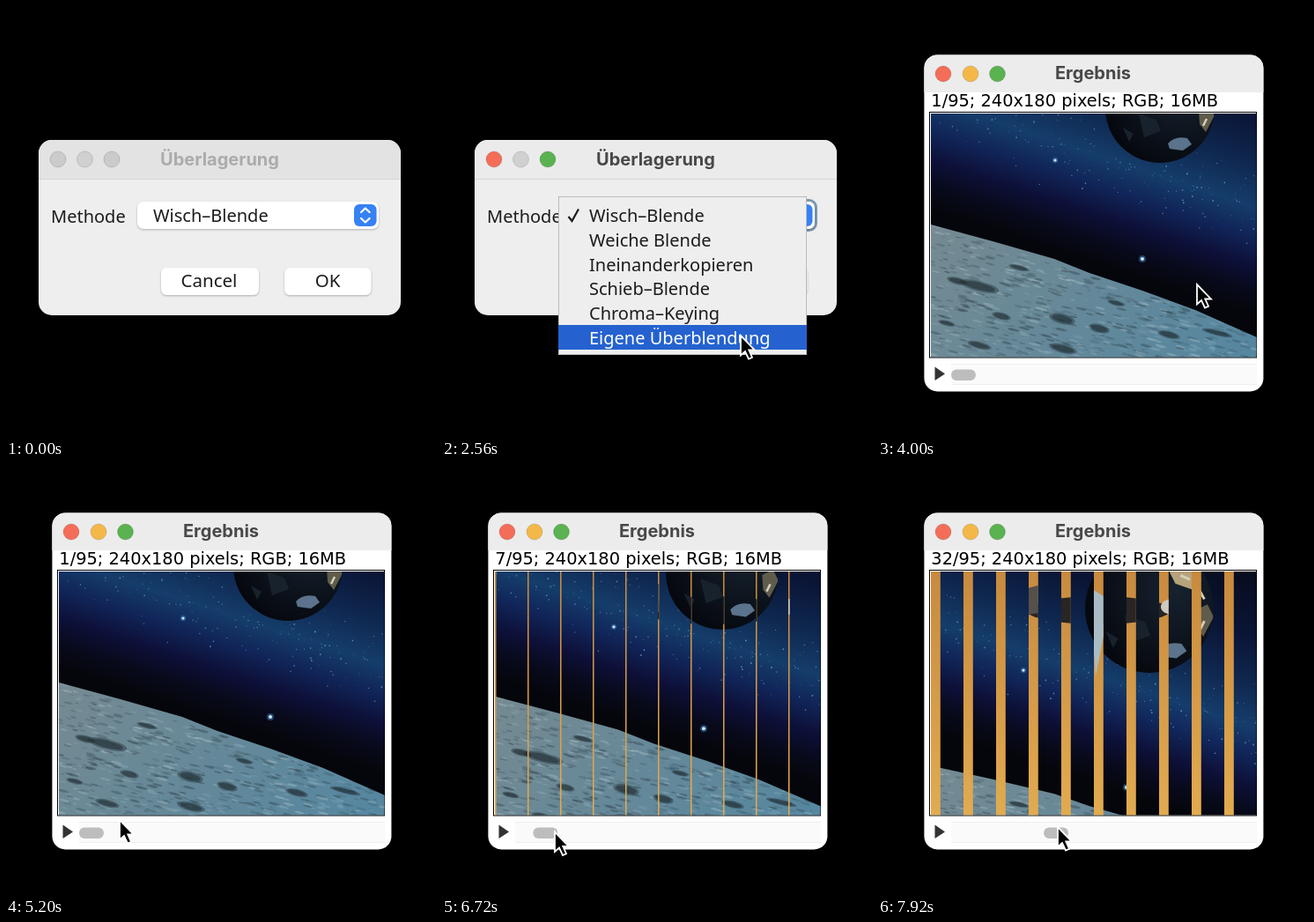
These frames come from a looping animation (488 by 488 pixels, 8000 ms). An HTML page:

```html
<!DOCTYPE html>
<html lang="de">
<head>
<meta charset="utf-8">
<style>
html, body { margin: 0; width: 100%; height: 100%; overflow: hidden; background: #000; }
svg { display: block; width: 100vw; height: 100vh; }
text { font: 20px "Noto Sans", sans-serif; fill: #1c1c1c; white-space: pre; }
.title { font: bold 20px Inter, sans-serif; fill: #484848; text-anchor: middle; }
.status { font: 19.4px "DejaVu Sans", sans-serif; fill: #000; }
.mid { text-anchor: middle; font-size: 20.5px; }
.raised { fill: #fff; filter: drop-shadow(0 1px 1px #0004); }
</style>
</head>
<body>
<svg viewBox="0 0 488 488">
  <defs>
    <linearGradient id="sky" gradientUnits="userSpaceOnUse" x1="300" y1="-30" x2="195" y2="290">
      <stop stop-color="#05070f"/><stop offset=".32" stop-color="#0a1536"/>
      <stop offset=".48" stop-color="#0f2850"/><stop offset=".61" stop-color="#153d6b"/>
      <stop offset=".7" stop-color="#11265a"/><stop offset=".8" stop-color="#0d1038"/>
      <stop offset=".88" stop-color="#080a1c"/><stop offset=".96" stop-color="#05060b"/>
    </linearGradient>
    <linearGradient id="rock" x2="1" y2=".6">
      <stop stop-color="#768a91"/><stop offset="1" stop-color="#5687a0"/>
    </linearGradient>
    <linearGradient id="amber" x2="0" y2="1">
      <stop stop-color="#c88a3e"/><stop offset="1" stop-color="#e2ab50"/>
    </linearGradient>
    <radialGradient id="globe" cx=".7" cy=".35" r=".75">
      <stop stop-color="#16222f"/><stop offset="1" stop-color="#05070d"/>
    </radialGradient>
    <clipPath id="frame"><rect x="60" y="122" width="369.500" height="276.5"/></clipPath>
    <clipPath id="horizon"><path d="M60 248L130 267 200 287 240 303 300 323 360 345 430 376V460H60Z"/></clipPath>
    <clipPath id="slats"></clipPath>
    <clipPath id="disc"><circle r="62"/></clipPath>
  </defs>

  <g id="dialog">
    <rect x="37" y="152" width="411" height="199" rx="15" fill="#eee"/>
    <path id="bar" d="M37 196V167a15 15 0 0 1 15-15H433a15 15 0 0 1 15 15V196Z"/>
    <path d="M37 196.500H448" stroke="#d6d6d6"/>
    <g stroke="#0002"><circle id="red" cx="59" cy="174" r="9"/><circle cx="89.500" cy="174" r="9" fill="#d0d0d0"/><circle id="green" cx="120" cy="174" r="9"/></g>
    <text id="heading" class="title" x="242.500" y="180.500">Überlagerung</text>
    <text x="51" y="246">Methode</text>
    <rect id="ring" x="147.500" y="220.500" width="277" height="34" rx="8" fill="none" stroke="#7d98ad" stroke-width="3"/>
    <rect class="raised" x="149" y="222" width="274" height="31" rx="7"/>
    <rect x="395" y="225" width="25.500" height="25" rx="6" fill="#3681f5"/>
    <path d="M403 234l4.800-4.500 4.800 4.500M403 241l4.800 4.500 4.800-4.500" fill="none" stroke="#fff" stroke-width="2.200" stroke-linecap="round" stroke-linejoin="round"/>
    <text id="choice" x="167" y="245"></text>
    <rect class="raised" x="176" y="297" width="111" height="31" rx="6"/>
    <text class="mid" x="230.500" y="319">Cancel</text>
    <rect class="raised" x="316" y="297" width="98.500" height="31" rx="6"/>
    <text class="mid" x="365" y="319">OK</text>
    <g id="menu">
      <rect x="132.500" y="216.500" width="281" height="179" fill="#eee" stroke="#bbb"/>
      <rect id="hover" x="132" width="282" height="28" fill="#2562d0"/>
      <path d="M143.500 239l4 5L155 230.500" fill="none" stroke="#1c1c1c" stroke-width="2.200"/>
      <g id="items"></g>
    </g>
  </g>

  <g id="result">
    <rect x="52.400" y="55.400" width="385" height="382" rx="15" fill="#fff"/>
    <path d="M52.400 98V70.400a15 15 0 0 1 15-15H422.400a15 15 0 0 1 15 15V98Z" fill="#ececec"/>
    <g stroke="#0002"><circle cx="74" cy="77" r="9" fill="#f46d58"/><circle cx="105" cy="77" r="9" fill="#f4b848"/><circle cx="135.500" cy="77" r="9" fill="#5ab250"/></g>
    <text class="title" x="244" y="83">Ergebnis</text>
    <text id="status" class="status" x="60.300" y="114"></text>
    <rect x="58.500" y="120.500" width="371" height="278.500" fill="#fff" stroke="#000"/>
    <g clip-path="url(#frame)">
      <g id="space"><rect x="-50" y="-150" width="700" height="700" fill="url(#sky)"/></g>
      <g id="earth">
        <circle r="62" fill="url(#globe)"/>
        <g clip-path="url(#disc)">
          <path d="M9 40Q17 31 31 34L36 41 26 48 11 46Z" fill="#5b738c"/>
          <path d="M44 2L56 -4 62 8 52 27 45 18Z" fill="#5f5c4c"/>
          <path d="M18 -38L38 -45 50 -28 42 -18 25 -24Z" fill="#b6a37b"/>
          <path d="M-24 6l20 7 5 13-19 7zM-42 22l12 7-5 9z" fill="#18222c"/>
          <path d="M48 -18l5 9M53 12l-4 8M30 -32l9 4" stroke="#d5cfb8" stroke-width="2.500"/>
        </g>
      </g>
      <g id="moon"><g id="ground" clip-path="url(#horizon)"><rect x="60" y="240" width="370" height="220" fill="url(#rock)"/></g></g>
      <g clip-path="url(#slats)">
        <rect x="60" y="122" width="370" height="277" fill="url(#amber)"/>
        <g id="bird">
          <ellipse cx="250" cy="166" rx="82" ry="16" fill="#292523"/>
          <path d="M166 142l26-7 14 30-36 6z" fill="#55504a"/>
          <path d="M240 140l16 10 2 35-11 56z" fill="#a9bcc6"/>
          <ellipse cx="334" cy="162" rx="13" ry="9" fill="#cfcac0"/>
        </g>
      </g>
    </g>
    <rect x="83" y="406" width="347" height="24" fill="#fafafa"/>
    <path d="M83 406.500H430M83 429.500H430" stroke="#efefef"/>
    <path d="M64.500 409.500L76 417.500 64.500 425Z" fill="#333"/>
    <rect id="thumb" y="412.500" width="28" height="12.500" rx="6.200" fill="#bdbdbd"/>
  </g>
  <path id="cursor" d="M0 0V22.500L5 18 9 26.500 13 24.700 9.300 16.500H16Z" stroke="#fff" stroke-width="1.800"/>
</svg>
<script>
const $ = id => document.getElementById(id);
const set = (el, attrs) => { for (const k in attrs) el.setAttribute(k, attrs[k]); };
const add = (parent, tag, attrs) => {
  const el = document.createElementNS('http://www.w3.org/2000/svg', tag);
  set(el, attrs);
  return parent.appendChild(el);
};
const show = (id, on) => set($(id), { visibility: on ? 'inherit' : 'hidden' });

let seed = 7;
const rnd = () => (seed = seed * 16807 % 2147483647) / 2147483647;

const methods = ['Wisch–Blende', 'Weiche Blende', 'Ineinanderkopieren', 'Schieb–Blende', 'Chroma–Keying', 'Eigene Überblendung'];
const rows = methods.map((m, i) => {
  const el = add($('items'), 'text', { x: 167, y: 245 + 27.8 * i });
  el.textContent = m;
  return el;
});

// Stars along the bright band
for (let i = 0; i < 260; i++) {
  const x = 40 + rnd() * 460;
  const y = 109 + .32 * (x - 60) + (rnd() + rnd() - 1) * 55;
  add($('space'), 'circle', { cx: x, cy: y, r: .4 + rnd() * .5, fill: '#79a8d0', opacity: .25 + rnd() * .6 });
}
const glow = (parent, x, y, r) => {
  add(parent, 'circle', { cx: x, cy: y, r: r * 2, fill: '#3d80c0', opacity: .5 });
  add(parent, 'circle', { cx: x, cy: y, r, fill: '#cfe8fa' });
};
glow($('space'), 201, 175, 1.6);
const lowStar = add($('space'), 'g', {});
glow(lowStar, 300, 287, 2);

// Lunar surface: fine streaks and craters
const patch = (x, y, rx, ry, fill, opacity) =>
  add($('ground'), 'ellipse', { cx: x, cy: y, rx, ry, fill, opacity, transform: `rotate(14 ${x} ${y})` });
for (let i = 0; i < 1000; i++) {
  const x = 60 + rnd() * 370;
  const y = 245 + .34 * (x - 60) + rnd() * 155;
  const s = .4 + rnd();
  patch(x, y, 5 * s, 1.1 * s, rnd() < .6 ? '#26343c' : '#aec5cc', .12 + rnd() * .28);
}
[[115, 318, 23, 6], [209, 355, 15, 6], [251, 366, 12, 5], [90, 312, 12, 4], [140, 352, 11, 4], [78, 360, 10, 3],
 [210, 389, 16, 5], [330, 373, 13, 4], [160, 297, 12, 3], [385, 371, 18, 3], [270, 337, 10, 3], [115, 385, 14, 4]]
  .forEach(([x, y, rx, ry]) => {
    patch(x, y, rx, ry, '#1c282f', .4);
    patch(x, y, rx * .8, ry * .7, '#1c282f', .5);
  });

const slats = Array.from({ length: 10 }, (_, i) =>
  add($('slats'), 'rect', { x: 60 + 37 * i, y: 122, height: 277, width: 0 }));

// Linear interpolation over [time, ...values] keys
function at(keys, t) {
  let i = 0;
  while (i < keys.length - 2 && t >= keys[i + 1][0]) i++;
  const [a, b] = [keys[i], keys[i + 1]];
  const u = Math.max(0, Math.min(1, (t - a[0]) / (b[0] - a[0])));
  return a.slice(1).map((v, j) => v + (b[j + 1] - v) * u);
}
const path = [[0, 510, 262], [320, 490, 258], [800, 410, 239], [1760, 410, 239], [2000, 380, 262], [2480, 339, 374],
  [2800, 339, 374], [3280, 362, 316], [4320, 362, 316], [4720, 270, 362], [5200, 129, 404], [5600, 104, 420],
  [6160, 103, 420], [6240, 106, 419], [7200, 150, 416], [7920, 204, 412]];
const slide = [[6160, 1], [6240, 2], [6640, 6], [7200, 16], [7920, 32]];

function drawDialog(t, y) {
  const visible = t < 3520, active = t >= 880, open = t >= 1040 && t < 2800, hot = t >= 1840;
  show('dialog', visible);
  show('ring', visible && active);
  show('menu', open);
  show('hover', open && hot);
  set($('bar'), { fill: active ? '#ebebeb' : '#e3e3e3' });
  set($('red'), { fill: active ? '#f46d58' : '#cbcbcb' });
  set($('green'), { fill: active ? '#5ab250' : '#cbcbcb' });
  $('heading').style.fill = active ? '#484848' : '#ababab';
  $('choice').textContent = methods[t < 2800 ? 0 : 5];
  const row = Math.max(0, Math.min(5, Math.floor((y - 223) / 27.8)));
  set($('hover'), { y: 223 + 27.8 * row });
  rows.forEach((el, i) => el.style.fill = hot && i === row ? '#fff' : '');
}

function drawResult(t) {
  show('result', t >= 4000);
  const n = Math.round(at(slide, t)[0]);
  $('status').textContent = n + '/95; 240x180 pixels; RGB; 16MB';
  set($('thumb'), { x: 83 + (n - 1) * 3.39 });
  const width = Math.floor(24 * (n - 1) / 95) * 37 / 24;
  slats.forEach(s => set(s, { width }));

  // The film behind the slats starts moving after its second picture
  const k = Math.max(0, n - 2);
  set($('space'), { transform: `translate(${-1.2 * k} ${1.97 * k})` });
  set(lowStar, { transform: `translate(${.6 * k} ${.7 * k})` });
  set($('earth'), { transform: `translate(${320 - .4 * k} ${116 + 1.6 * k}) scale(${1 + .0059 * k})` });
  set($('moon'), { transform: `matrix(1 ${-.0017 * k} 0 1 0 ${3.25 * k})` });
  set($('bird'), { transform: `translate(${2.3 * (30 - k)} 0)` });
}

function draw(now) {
  const t = Math.floor(now % 8000 / 80) * 80;
  const [x, y] = at(path, t);
  set($('cursor'), { transform: `translate(${x} ${y})` });
  drawDialog(t, y);
  drawResult(t);
}
const start = performance.now();
function loop() {
  draw(performance.now() - start);
  requestAnimationFrame(loop);
}
loop();
</script>
</body>
</html>
```
